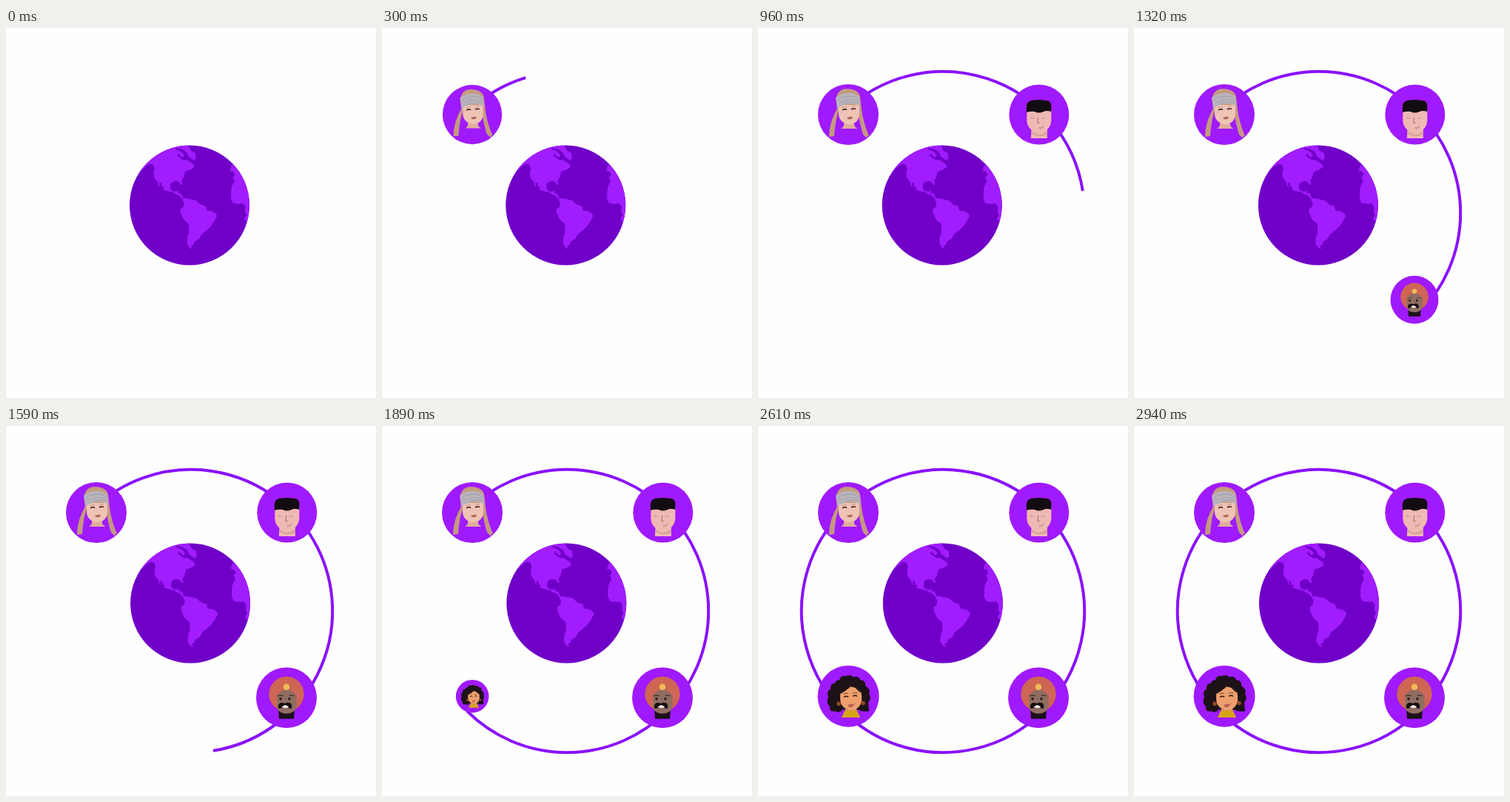
These frames come from a looping animation (500x500 px, 3060 ms). An HTML page:

```html
<!DOCTYPE html>
<html lang="en">
<head>
<meta charset="utf-8">
<title>Connected world</title>
<style>
  html, body { margin: 0; width: 100%; height: 100%; overflow: hidden; background: #fefefe; }
  svg { display: block; width: 100%; height: 100%; }
</style>
</head>
<body>
<svg viewBox="0 0 500 500">
  <defs>
    <clipPath id="rim"><circle cx="248" cy="239.5" r="81"/></clipPath>
  </defs>

  <path id="ring" fill="none" stroke="#8a12fb" stroke-width="4"/>

  <g id="globe">
    <circle cx="248" cy="239.5" r="81" fill="#7000c8"/>
    <g clip-path="url(#rim)" fill="#a11cff">
      <!-- North and Central America -->
      <path d="M176 199L190 186L194 183.500L199 184.500L201 190L199.500 195L200.500 203L205 208L206 213L208 215L207 208.500L210 210L211 215L214 214.500L212 218.500L220 221L226 222L230 225L234 226L237 230L242 231L239 229L237 224L232 222.500L233 219L230 221L225 220.500L222 217L222 211L226 207.500L231 207L234 208.500L237 212.500L238.500 211L237 206.500L240 202L242 194L248 192L255 188L252 183L247 180.500L245 178L240 178.500L234 175L231 171L233 170L238 175L241 173L239 169L235 166L230 164.500L228 162L236 163L243 167L247 174L254 179L256.500 176L256 169L250 166L246 158L240 150L200 150Z"/>
      <!-- South America -->
      <path d="M238 231L243 230L250 231.500L257 233L262 238L270 241L271.500 246.500L279 248L284 251L285 254.500L281 262L276 269L269 275L264 279L261 285L255 288.500L253 293L250 295L252.500 299L248 297L244.500 291L245 282L247.500 277L247 265L240 259L236 250L235.500 245L240 241L240.500 236Z"/>
      <!-- Africa and Europe -->
      <path d="M312 180L305 186L302.500 193L307 194L309.500 198L306.500 202L309 207L305 214L304 222L304 231L306.500 236.500L314 238L320 237L323.500 241L323 248L325 253L322 258L326 263L340 262V180Z"/>
    </g>
  </g>

  <!-- Blonde woman with headband -->
  <g class="avatar" data-x="122" data-y="117" data-start="0">
    <circle r="41" fill="#a01aff"/>
    <path d="M-16-23Q-14-35-1-35Q14-34 16-24L18-7Q20 10 28 29L25 29L27 32Q21 30 19 24Q15 10 13-5H-13Q-18 10-19 29L-26 30Q-26 10-14-10Z" fill="#c49a80"/>
    <path d="M-6 8H8V14Q9 18 13 19H-10Q-6 17-6 13Z" fill="#e0ad9c"/>
    <path d="M-13-13H15V-1Q15 7 9 11Q1 15-6 11Q-13 7-13-1Z" fill="#efc3b4"/>
    <path d="M-17-23Q0-35 15-24L16-12Q0-19-15-8Z" fill="#b9b4bc"/>
    <path d="M-15-20Q0-29 14-22M-12-16Q2-23 14-18M-9-13Q4-19 14-15" fill="none" stroke="#9c97a2" stroke-width=".7"/>
    <path d="M-8-6Q-5-8-2-6.500M4-7Q7-8.500 10-7.500" fill="none" stroke="#2a1a20" stroke-width="1.500"/>
    <path d="M-9-9Q-5-11-2-10M4-10Q7-12 10-11" fill="none" stroke="#b58875" stroke-width=".8"/>
    <path d="M-2 4.500Q1 2 6 3Q5 7 1 6.500Q-1 6-2 4.500Z" fill="#a9695c"/>
  </g>

  <!-- Man with short black hair -->
  <g class="avatar" data-x="379.8" data-y="117" data-start="492">
    <circle r="40.5" fill="#a01aff"/>
    <path d="M-10 16H11V32H-11Z" fill="#efb9b3"/>
    <path d="M-10 22Q0 32 11 22V27Q0 32-10 26Z" fill="#d6a397"/>
    <path d="M-16.500-7H16.500V8Q16 18 7 23Q0 26-7 23Q-16 18-16.500 8Z" fill="#efb9b3"/>
    <path d="M-17-3V-12Q-16-19-8-19.500Q3-21 13-18.500Q17-16 16.500-11V-4Q10-6 6-4Q0-1-6-4Q-11-5-17-3Z" fill="#120c12"/>
    <path d="M-12 5H-7M3 5H8" stroke="#b9838d" stroke-width="1.200"/>
    <path d="M-1 4L-2 11Q-1 12.500 1 11.500M0 18Q5 19 6 15" fill="none" stroke="#a2636f" stroke-width="1"/>
  </g>

  <!-- Man with turban -->
  <g class="avatar" data-x="379" data-y="367.2" data-start="1130">
    <circle r="41" fill="#a01aff"/>
    <circle cy="-5" r="23.700" fill="#cf6555"/>
    <path d="M-11 16H11L10 28.500H-10Z" fill="#1b1118"/>
    <path d="M-13-3Q-8-10 0-12Q8-10 13.500-3V12Q12 21 0 21.500Q-12 21-13 12Z" fill="#8f6d60"/>
    <circle cy="-14.500" r="4.200" fill="#efbd55"/>
    <path d="M-12-2Q-8-5-4-2.500M4-2.500Q8-5 11-2" fill="none" stroke="#4a332d" stroke-width="1.200"/>
    <g fill="#21151a"><circle cx="-8" cy="1.500" r="1.700"/><circle cx="4" cy="1.500" r="1.700"/></g>
    <path d="M-11 14Q-12 6-5 7Q-2 7-2 8Q0 6 5 7Q8 9 7 14Q4 16 2 12H-5Q-8 16-11 14Z" fill="#120c10"/>
    <path d="M-6 12Q-2 8 3 12Q-1 16-6 12Z" fill="#f4efee"/>
  </g>

  <!-- Woman with curly hair -->
  <g class="avatar" data-x="122.1" data-y="365.2" data-start="1778">
    <circle r="41.5" fill="#a01aff"/>
    <path d="M-12-22Q-10-29-4-27Q2-30 7-26Q14-28 16-22Q24-22 23-14Q31-10 28-3Q32 3 27 8Q27 13 28 20Q20 22 13 18H-8Q-12 24-18 20Q-26 22-25 14Q-31 8-27 1Q-30-7-24-10Q-25-17-18-18Q-17-22-12-22Z" fill="#1d1218"/>
    <path d="M-4 14H11V19L16 28.500H-9L-4 20Z" fill="#d68d59"/>
    <path d="M-4 18Q4 22 11 18L16 28.500H-9Z" fill="#d5a516"/>
    <path d="M-11-3Q-7-12 3-13Q14-12 18-4V6Q17 14 9 18Q3 20-3 17Q-11 13-11 4Z" fill="#eda06d"/>
    <path d="M-12 4Q-11-13 3-13Q-1-9-11-3ZM18 4Q19-9 9-12Q13-7 18-4Z" fill="#1d1218"/>
    <g fill="#93482a"><circle cx="-13" cy="10" r="2.800"/><circle cx="20" cy="9" r="2.800"/></g>
    <path d="M-6 1Q-3-1 0 1M6 0Q9-2 12 0" fill="none" stroke="#2a1414" stroke-width="1.600"/>
    <path d="M-7-3Q-3-5 0-3.500M6-4Q9-6 12-4" fill="none" stroke="#6b3a28" stroke-width=".9"/>
    <path d="M-1 12Q3 9 8 11Q6 15 3 15Q0 15-1 12Z" fill="#bb6055"/>
    <circle cx="9" cy="10" r=".5" fill="#6b3a28"/>
  </g>
</svg>
<script>
  const LOOP = 3060, STEP = 30, LAST = 2940;
  const CENTER = 250, RADIUS = 191.2;
  const ring = document.getElementById('ring');
  const globe = document.getElementById('globe');
  const avatars = [...document.querySelectorAll('.avatar')];

  const clamp = v => Math.min(1, Math.max(0, v));
  const easeOut = u => 1 - (1 - u) ** 2;
  const easeInOut = u => (1 - Math.cos(Math.PI * u)) / 2;

  function pointAt(degrees) {
    const a = degrees * Math.PI / 180;
    return `${CENTER + RADIUS * Math.sin(a)} ${CENTER - RADIUS * Math.cos(a)}`;
  }

  // The ring grows by a quarter turn between neighbouring avatars.
  function sweepAt(t) {
    let sweep = 0;
    for (let i = 0; i < 4; i++) sweep += 90 * easeInOut(clamp((t - 109 - 630 * i) / 507));
    return Math.min(sweep, 359.9);
  }

  function render(t) {
    const sweep = sweepAt(t);
    ring.setAttribute('d', sweep > 0
      ? `M${pointAt(-45)}A${RADIUS} ${RADIUS} 0 ${+(sweep > 180)} 1 ${pointAt(sweep - 45)}`
      : '');
    globe.setAttribute('transform', `translate(${2 * t / LAST})`);
    for (const avatar of avatars) {
      const { x, y, start } = avatar.dataset;
      const scale = easeOut(clamp((t - start) / 350));
      avatar.setAttribute('transform', `translate(${x} ${y}) scale(${scale})`);
    }
  }

  const begin = performance.now();
  function tick() {
    const t = (performance.now() - begin) % LOOP;
    render(Math.min(LAST, Math.floor(t / STEP) * STEP));
    requestAnimationFrame(tick);
  }
  tick();
</script>
</body>
</html>
```
